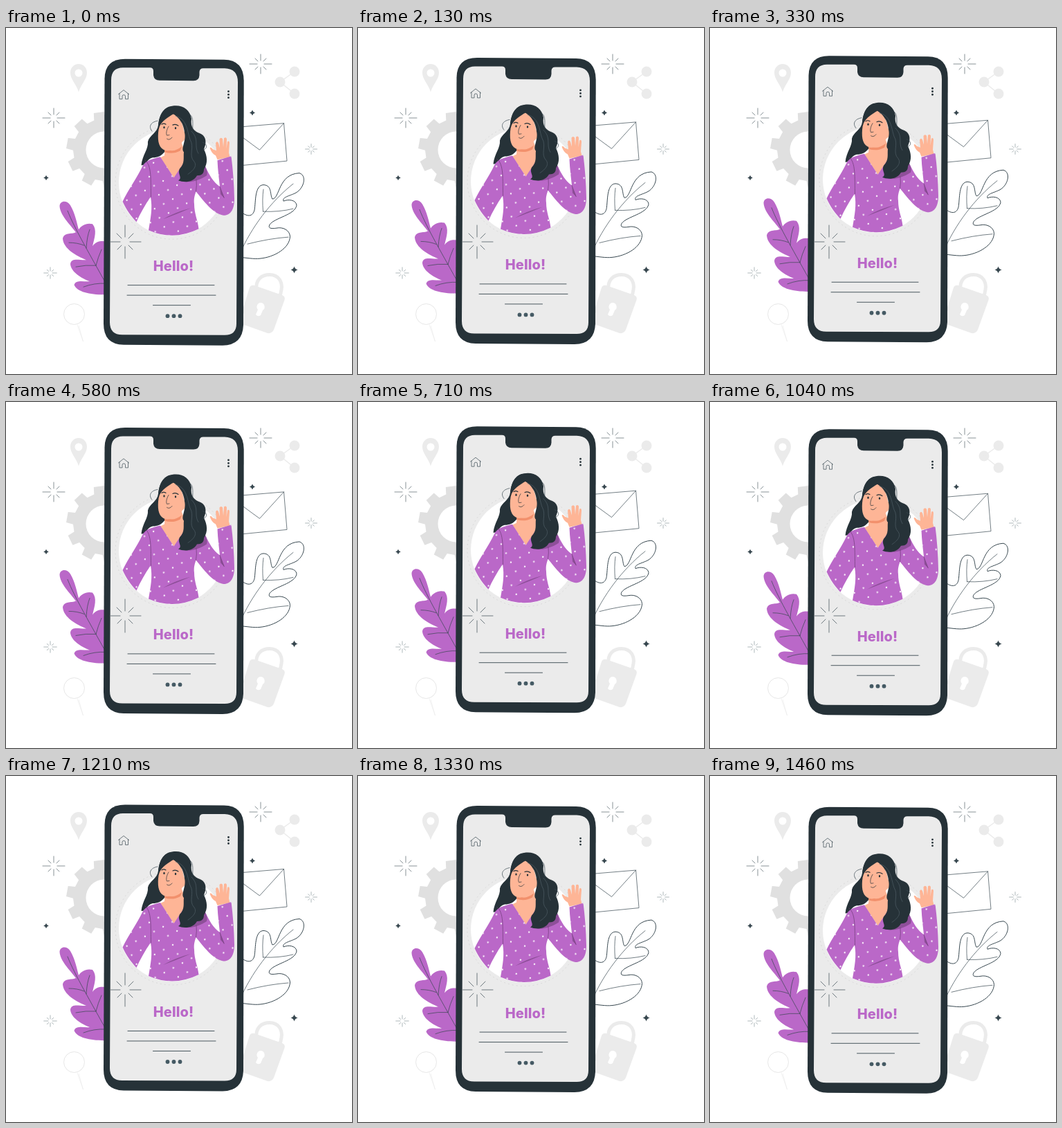
Animation, 500 px wide and 500 px high, one loop 1.5 s. Source, as an HTML page:

```html
<!DOCTYPE html>
<html lang="en">
<head>
<meta charset="utf-8">
<title>Hello</title>
<style>
  html, body { margin: 0; width: 100%; height: 100%; overflow: hidden; background: #fff; }
  svg { display: block; width: 100%; height: 100%; }
  .float { animation: float 1.5s linear -25ms infinite; }
  @keyframes float {
    0%, 100% { transform: translateY(.5px); }
    50% { transform: translateY(-9.5px); }
  }
  .line { fill: none; stroke: #37474f; stroke-width: .7; stroke-linecap: round; stroke-linejoin: round; }
  .spark { stroke-width: .6; }
  .hello { font: 800 20px Inter, sans-serif; letter-spacing: .1px; text-anchor: middle; fill: #ba68c8; }
</style>
</head>
<body>
<svg viewBox="0 0 500 500">
  <defs>
    <path id="spark" vector-effect="non-scaling-stroke" d="M0-14V-5M0 5V14M-16 0H-5M5 0H16M-8-8L-4-4M4 4L8 8M8-8L4-4M-4 4L-8 8"/>
    <path id="star" d="M0-5Q1-1 5 0Q1 1 0 5Q-1 1-5 0Q-1-1 0-5Z"/>
    <pattern id="dots" width="21" height="21" patternUnits="userSpaceOnUse" patternTransform="translate(205 211) rotate(17)">
      <g fill="#fff"><circle cx="3" cy="3" r="1.15"/><circle cx="13.5" cy="13.5" r="1.15"/></g>
    </pattern>
    <path id="top" d="M223 186C211 189 201 191 197 200C189 217 177 233 168.500 250.500C174 263 181 272 188.500 280C194 268 201 255 209 244C212 260 209 275 206 292Q242 308 278.500 290C277 277 272 268 272 254C271 246 273 241 274.500 236C285 249 299 268 314 270.500C325 271 330 261 330 247C329.500 225 328 205 325.500 185L305.500 191C306 205 308 218 309 229C299 222 294 212 289 202C285 194 273 189 262 187L242.500 216Z"/>
  </defs>

  <!-- still background -->
  <path id="gear" fill="#e0e0e0"/>
  <circle cx="142" cy="176" r="26.500" fill="#fff"/>
  <g fill="#ebebeb">
    <path fill-rule="evenodd" d="M105 52C112 52 117 57.500 117 64.500C117 74 109 80 105 92.500C101 80 93 74 93 64.500C93 57.500 98 52 105 52ZM105 59.500A5.500 5.500 0 1 0 105 70.500A5.500 5.500 0 1 0 105 59.500Z"/>
    <circle cx="417" cy="63" r="7.500"/><circle cx="396" cy="78" r="7.500"/><circle cx="417" cy="95" r="7.500"/>
    <path d="M417 63L396 78L417 95" fill="none" stroke="#ebebeb" stroke-width="1.500"/>
    <path d="M362 379C360 363 370 356.500 381 356.500C394 356.500 400 367 398 378L396 388" fill="none" stroke="#ebebeb" stroke-width="5"/>
    <path d="M359 372L399 386Q404 388 402.500 393L387 436Q384 442 378 441L336 426L352 375Q354 371 359 372Z"/>
  </g>
  <path d="M368 397A6 6 0 0 1 371 408L368 415Q364 418 361 414L364 407A6 6 0 0 1 368 397Z" fill="#fff"/>
  <g fill="none" stroke="#e0e0e0" stroke-width=".8">
    <circle cx="98.500" cy="413.500" r="15"/>
    <path d="M103 429L111.500 453L105 430" stroke="#eee"/>
  </g>
  <g fill="#37474f">
    <use href="#star" transform="translate(58 216.500) scale(.75)"/>
    <use href="#star" transform="translate(356 122.500) scale(.8)"/>
    <use href="#star" transform="translate(416.500 349.500)"/>
  </g>
  <g class="line spark">
    <use href="#spark" x="69" y="130"/>
    <use href="#spark" x="368" y="52"/>
    <use href="#spark" transform="translate(441 175) scale(.53)" stroke="#78868c"/>
    <use href="#spark" transform="translate(64 354) scale(.58)" stroke="#78868c"/>
  </g>

  <g class="float">
    <!-- envelope and leaves -->
    <g class="line">
      <path d="M330 143.500L401.500 137.500L406 192L330 199.500Z" fill="#fff"/>
      <path d="M338 155L366.500 176L401.500 137.500"/>
      <path style="fill:#fff;stroke-width:1" d="M336 262C345 272 356 275 359 263C361 252 359 227 372 226.500C385 227 381 241 385 247C396 246 393 211 424 209.500C435 213 431 231 419 238C409 243 399 244 401 250C408 247 419 248 420 256C418 270 388 274 381 284C378 290 384 290 391 289C400 287 410 292 410.500 301C410 318 388 331 367 333C358 334 349 332 336 331Z"/>
      <path d="M338 326C354 289 382 251 415 225M371.500 265Q370 247 372 233M371.500 265Q395 266 415 261M349 312Q380 304 408 302"/>
    </g>
    <path fill="#ba68c8" d="M77.500 257C78 249 88 248 93 256C100 268 102 280 105 291C109 285 116 281 125 283C132 291 128 303 125 315C131 307 139 307 148 309V385C125 386 103 382 98.500 371C101 363 113 367 121 366C108 361 94 352 93 341C94 331 107 336 116 335C102 329 83 319 82 304C84 295 94 298 101 295C92 283 78 270 77.500 257Z"/>
    <path class="line" d="M89 264C99 290 123 330 147 374M116 318Q117 301 121 291M91 310Q103 310 113 314M130 343Q133 331 138 320M101 345Q115 342 130 343M112 374Q128 368 144 369"/>

    <!-- phone -->
    <path fill="#263238" d="M172 44.500L315 45.500Q343.500 46 343.700 76L343 429Q342 458 313 458.500L170 457.500Q141 457 141 427L142.500 73Q143 44.500 172 44.500Z"/>
    <path fill="#ebebeb" d="M169 57L208 57Q213 57 213 62V68Q214 75.500 222 75.500L271 76Q279 76 279.500 68V63Q280 58 285 58H316Q335 58.500 335 78L333 427Q333 443.500 316 443.500L168 443Q150 443 150 425L152 75Q152 57 169 57Z"/>
    <path class="line" d="M162.500 95.500L170 89.500L177.500 95.500M164 94.500V102.500H168V98.500Q168 96.500 170.200 96.500Q172.500 96.500 172.500 98.500V102.500H176.500V94.500"/>
    <g fill="#263238"><circle cx="321.500" cy="91.500" r="1.400"/><circle cx="321.500" cy="96" r="1.400"/><circle cx="321.500" cy="100.500" r="1.400"/></g>
    <circle cx="240" cy="223" r="82" fill="none" stroke="#d9d9d9" stroke-dasharray="2 4"/>
    <circle cx="240" cy="223" r="77" fill="#fff"/>

    <!-- hair behind, neck and face -->
    <path fill="#263238" d="M241 113C227 113 221 128 220 140C219 151 207 155 205 164C206 175 197 183 195.500 198C203 199 203 189 212 187C219 187 224 185 229 179L250 170L255 120Z"/>
    <g fill="#feb596">
      <path d="M230 168L229 184L223 187L242.500 216L263 190L253 164Z"/>
      <path d="M305.500 190L303 184C299 182 296 178 294.500 173Q296 171 299 175L304 177L303 166Q305 162 307 166L309 173L308.500 160Q311 157 313 160L314 172L315 159Q318 157 319 160L318.500 174L320 164Q323 162 323 166L322 180L323.500 186Z"/>
    </g>
    <path fill="#f2906c" d="M230 173Q240 182 254 171L252 177Q241 183 229 179Z"/>
    <path fill="#feb596" d="M240 123C229 128 221 138 220 151C219 164 221 174 231 177C242 178 250 172 255 164C262 160 262 151 257 149C256 137 250 128 240 123Z"/>
    <g class="line" style="stroke:#263238">
      <path d="M225 139Q228 137 231 139M241 140Q245 138 249 141" style="stroke-width:1.200"/>
      <path d="M235 142C232 147 231 152 232.500 155L236 154.500M232.500 160Q236 163 240 158"/>
    </g>
    <ellipse cx="228.500" cy="143.500" rx="1.200" ry="1.700" fill="#263238"/>
    <ellipse cx="245" cy="144.500" rx="1.200" ry="1.700" fill="#263238"/>

    <!-- clothes -->
    <use href="#top" fill="#ba68c8"/>
    <use href="#top" fill="url(#dots)"/>
    <path fill="#8e4f99" d="M252 219C263 226 279 220 290 213Q292 208 288 200L275 190Z"/>
    <path fill="#8e4f99" d="M227 276Q244 266 267 260Q246 269 227 276ZM309 229L310.500 234L316 246L310 240Z"/>
    <path class="line" style="stroke:#6f3c78" d="M201 191C211 198 209 221 209.500 244M274.500 236Q276 227 275 219M309 229L315 245"/>

    <!-- front hair -->
    <path fill="#263238" d="M220.500 144C220 127 227 114 240 112.500C254 110 266 117 268 131C266 143 272 149 280 152C290 156 290 166 286 175C291 185 292 195 286 204C286 210 283 213 276 213C270 224 256 223 249 220C256 216 247 211 251 203C259 195 256 187 257 179C252 174 261 163 258 151C257 139 251 129 242 124C235 128 225 134 220.500 144Z"/>
    <g class="line">
      <path d="M219 134C208 136 206 143 211 149M266 125C272 130 269 140 270 147M284 165C291 167 292 174 285 176"/>
      <path style="stroke:#56666e;stroke-width:.6" d="M245 127C262 131 262 150 266 161C273 172 263 184 272 193C277 200 269 207 263 211M268 149C280 161 271 170 278 181"/>
    </g>

    <!-- captions -->
    <text class="hello" x="242" y="351">Hello!</text>
    <path class="line" style="stroke-width:.9" d="M176 371.500H301M175 386H303M212.500 400.500H266.500"/>
    <g fill="#455a64"><circle cx="233.500" cy="416" r="2.900"/><circle cx="242.500" cy="416" r="2.900"/><circle cx="251.500" cy="416" r="2.900"/></g>
  </g>

  <path class="line" d="M172 285V302M172 316V333M151.500 309H165M179 309H195M160 297L167 304M177 314L183 320M184 297L177 304M167 314L161 320"/>
</svg>
<script>
  // ten-toothed wheel, each tooth a short trapezoid
  const teeth = 10, points = [];
  for (let i = 0; i < teeth; i++) {
    for (const [turn, r] of [[-11, 45], [-8, 55], [8, 55], [11, 45]]) {
      const a = (i * 360 / teeth + 10 + turn) * Math.PI / 180;
      points.push((142 + r * Math.cos(a)).toFixed(1) + " " + (176 + r * Math.sin(a)).toFixed(1));
    }
  }
  document.getElementById("gear").setAttribute("d", "M" + points.join("L") + "Z");
</script>
</body>
</html>
```
